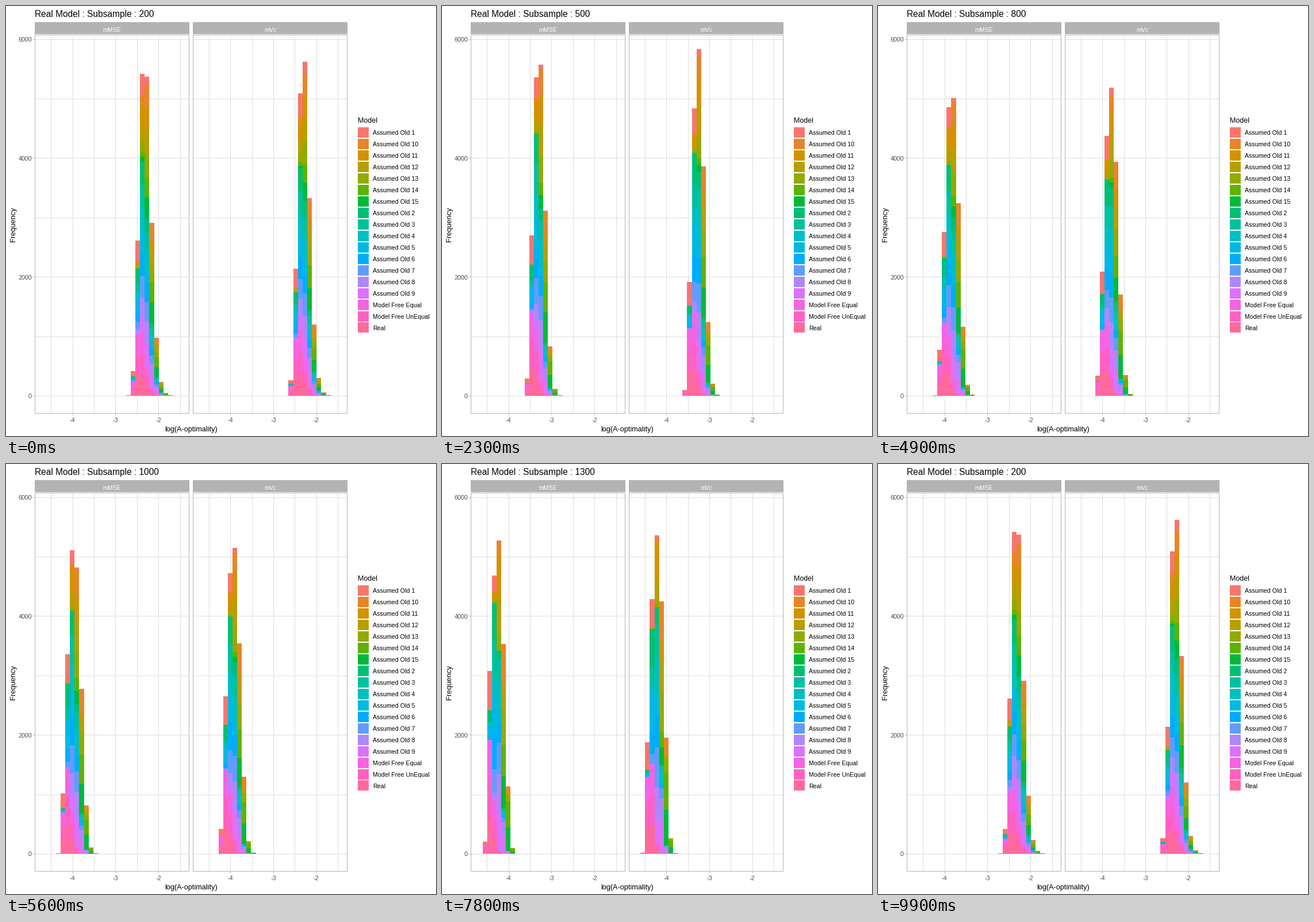
Recreate the animation shown at these times as a matplotlib script. Size 748x748 px, loop 10000 ms.

```python
import math
from itertools import accumulate, chain, combinations

import numpy as np
import matplotlib.pyplot as plt
from matplotlib.animation import FuncAnimation
from matplotlib.collections import PolyCollection
from matplotlib.patches import Rectangle

SIZE, DPI = 748, 100
PX = 72 / DPI                       # one pixel in points
BINS, BIN_PX = 30, 8.13
X0, BASE, Y_SCALE = 62.4, 678, 0.1034
PANELS, PANEL_STEP = ("mMSE", "mVc"), 274.6
GRID, BORDER, TICK_TEXT = "#DEDEDE", "#B3B3B3", "#4D4D4D"

SUBSAMPLES = range(200, 1501, 100)
STEPS = [4] * 3 + [3] * 3 + [2] + [3] * 7
HOLD = 4
STARTS = list(accumulate(STEPS[:-1], lambda s, n: s + n + HOLD, initial=HOLD))

# each assumed model adds a subset of four terms, each with its own cost
TERMS = (-0.05, 0.65, 1.15, 1.45)
SUBSETS = chain.from_iterable(combinations(TERMS, r) for r in range(1, 5))
SHIFTS = {f"Assumed Old {i}": sum(s) for i, s in enumerate(SUBSETS, 1)}
SHIFTS |= {"Model Free Equal": 0, "Model Free UnEqual": 0, "Real": 0}
LABELS = sorted(SHIFTS)
OFFSETS = np.array([SHIFTS[name] for name in LABELS])
OFFSETS -= OFFSETS.mean()
RUNS, SKEW = 1000, 0.2

erf = np.vectorize(math.erf)


def hue(i, n):
    """Evenly spaced hue in polar LUV with chroma 100 and lightness 65."""
    light, chroma = 65, 100
    h = math.radians(15 + 360 * i / n)
    u = chroma * math.cos(h) / (13 * light) + 0.1978
    v = chroma * math.sin(h) / (13 * light) + 0.4683
    y = ((light + 16) / 116) ** 3
    x, z = 9 * y * u / (4 * v), y * (12 - 3 * u - 20 * v) / (4 * v)
    linear = (3.2405 * x - 1.5371 * y - 0.4985 * z,
              -0.9693 * x + 1.8760 * y + 0.0416 * z,
              0.0556 * x - 0.2040 * y + 1.0572 * z)
    gamma = [12.92 * c if c <= 0.0031308 else 1.055 * c ** (1 / 2.4) - 0.055
             for c in linear]
    return tuple(min(1, max(0, c)) for c in gamma)


def skewed_cdf(y):
    """Cumulative share of a standardised, shifted log-normal."""
    z = np.log(np.maximum(1 + SKEW * y, 1e-9)) / SKEW + SKEW / 2
    return (1 + erf(z / math.sqrt(2))) / 2


def stack_tops(panel, n):
    """Upper edges of the stacked bars, one row per model."""
    x = math.log(n / 200)
    mean = 22.16 - x * (10.08 - 0.26 * x) + panel * (0.16 + 0.1 * x)
    centres = mean + OFFSETS * (0.62 + 0.2 * x)
    sd = math.exp(-0.34 * x)
    edges = np.arange(BINS + 1)
    counts = RUNS * np.diff(skewed_cdf((edges - centres[:, None]) / sd))
    return np.cumsum(counts[::-1], axis=0)[::-1]


TOPS = np.array([[stack_tops(p, n) for p in range(2)] for n in SUBSAMPLES])
COLORS = [hue(i, len(LABELS)) for i in range(len(LABELS))]

plt.rcParams["font.family"] = "Liberation Sans"
fig = plt.figure(figsize=(SIZE / DPI, SIZE / DPI), dpi=DPI, facecolor="white")
ax = fig.add_axes([0, 0, 1, 1])
ax.set_xlim(0, SIZE)
ax.set_ylim(SIZE, 0)
ax.axis("off")


def box(x, y, w, h, color, z=1):
    """Filled rectangle whose corner sits on a whole pixel."""
    ax.add_patch(Rectangle((round(x), round(y)), w, h, fc=color, lw=0,
                           zorder=z, antialiased=False))


def text(x, y, s, px, color="black", **kw):
    kw.setdefault("va", "baseline")
    return ax.text(x, y, s, fontsize=px * PX, color=color, **kw)


def grid_y(i):
    return 678 - 103.4 * i


def draw_panel(name, dx):
    left, width, top, height = round(50 + dx), 269, 50, 659
    for i in range(7):
        box(78.2 + 37.4 * i + dx, top, 1, height, GRID)
        box(left, grid_y(i), width, 1, GRID)
    for x in (left, left + width - 1):
        box(x, top, 1, height, BORDER, 5)
    for y in (top, top + height - 1):
        box(left, y, width, 1, BORDER, 5)
    box(left, 28, width, 21, BORDER)
    text(left + width / 2, 45, name, 10.5, "white", ha="center")
    for v in (-4, -3, -2):
        x = 414.8 + 74.8 * v + dx
        box(x, 709, 1, 3, BORDER)
        text(x, 724, str(v), 10.8, TICK_TEXT, ha="center")


for p, panel_name in enumerate(PANELS):
    draw_panel(panel_name, p * PANEL_STEP)
for i in (0, 2, 4, 6):
    box(47, grid_y(i), 3, 1, BORDER)
    text(45, grid_y(i) + 4.5, str(1000 * i), 10.8, TICK_TEXT, ha="right")

title = text(50, 19.4, "", 15.55)
text(322, 740, "log(A-optimality)", 12.6, ha="center")
text(13.5, 379.5, "Frequency", 12.8, ha="center", va="center", rotation=90)

text(612, 202.5, "Model", 12.5)
for i, label in enumerate(LABELS):
    y = 220 + 19.97 * i
    box(612, y - 9, 19, 18, COLORS[i])
    text(638, y + 4.4, label, 10.58)

left_edge = (X0 + BIN_PX * np.arange(BINS)
             + PANEL_STEP * np.arange(2)[:, None, None]
             + np.zeros((2, len(LABELS), BINS)))
right_edge = left_edge + BIN_PX
bar_colors = np.broadcast_to(np.array(COLORS)[None, :, None, :],
                             (2, len(LABELS), BINS, 3)).reshape(-1, 3)


def bar_corners(tops):
    lows = np.concatenate([tops[:, 1:], np.zeros((2, 1, BINS))], axis=1)
    y1, y2 = BASE - Y_SCALE * tops, BASE - Y_SCALE * lows
    corners = [(left_edge, y1), (right_edge, y1),
               (right_edge, y2), (left_edge, y2)]
    return np.stack([np.stack(c, axis=-1) for c in corners],
                    axis=-2).reshape(-1, 4, 2)


bars = PolyCollection(bar_corners(TOPS[0]), facecolors=bar_colors,
                      edgecolors="none", linewidths=0, antialiaseds=False,
                      zorder=3)
ax.add_collection(bars, autolim=False)


def state_at(frame):
    """Index of the state left behind, the next one, and the progress."""
    k = sum(s <= frame for s in STARTS) - 1
    if k < 0:
        return 0, 0, 1
    progress = min(1, (frame - STARTS[k] + 1) / STEPS[k])
    return k, (k + 1) % len(SUBSAMPLES), progress


def draw(frame):
    a, b, f = state_at(frame)
    bars.set_verts(bar_corners((1 - f) * TOPS[a] + f * TOPS[b]))
    nearest = b if f > 0.5 else a
    title.set_text(f"Real Model : Subsample : {SUBSAMPLES[nearest]}")
    return bars, title


anim = FuncAnimation(fig, draw, frames=100, interval=100, repeat=True)
plt.show()
```
